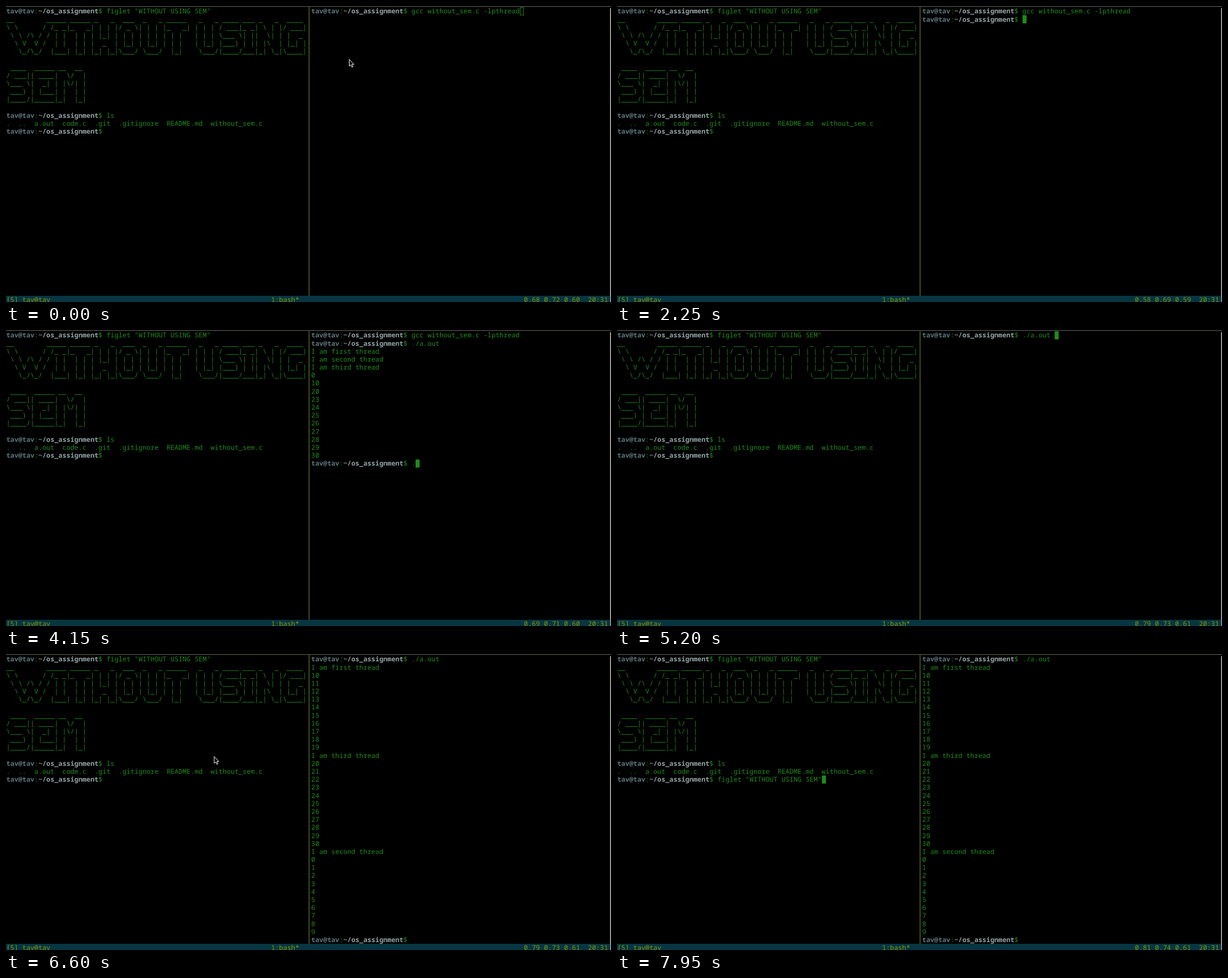
Recreate the animation shown at these times as an HTML page. Size 1069 px wide and 524 px high, loop 8 s.

```html
<!DOCTYPE html>
<html lang="en">
<head>
<meta charset="utf-8">
<title>Terminal session</title>
<style>
html, body { margin: 0; width: 100%; height: 100%; overflow: hidden; background: #000; }
svg { display: block; width: 1069px; height: 524px; }
text {
  font: 11.817px "Noto Sans Mono", "DejaVu Sans Mono", monospace;
  white-space: pre; fill: #1f8c1a; text-rendering: geometricPrecision;
}
.user { fill: #5d757c; font-weight: bold; }
.path { fill: #93a3a4; font-weight: bold; }
.bar text { fill: #859900; }
</style>
</head>
<body>
<svg viewBox="0 0 1069 524">
  <rect width="1069" height="524"/>
  <rect width="1069" height="1.6" fill="#45443f"/>
  <rect x="1067.4" y="4" width="1.6" height="520" fill="#b9b9b5"/>
  <rect x="535" y="2" width="1" height="511" fill="#7b8839"/>
  <g class="bar">
    <rect y="513" width="1067.4" height="11" fill="#073642"/>
    <g id="status"></g>
  </g>
  <g id="left"></g>
  <g id="right"></g>
  <rect id="caret" height="14.4"/>
  <path id="mouse" d="M.5.5V12.6L3.2 10.1 5.2 14.4 7.1 13.5 5.2 9.3H8.6Z" fill="#000" stroke="#fff" stroke-width="1"/>
</svg>
<script>
const LOOP = 8000, CW = 7.09, CH = 14.19, X0 = 0.5, Y0 = 2.3;
const RIGHT = 76, PROMPT_LEN = 25;
const USER = "tav@tav";
const $ = id => document.getElementById(id);
const colX = c => X0 + c * CW;
const rowY = r => Y0 + r * CH;
const escape = s => s.replace(/&/g, "&amp;").replace(/</g, "&lt;");
const line = (s, c, r) => `<text x="${colX(c)}" y="${rowY(r) + 11.05}">${s}</text>`;
const prompt = (cmd = "") =>
  `<tspan class="user">${USER}</tspan>:<tspan class="path">~/os_assignment</tspan>$ ${escape(cmd)}`;
const range = (a, b) => Array.from({ length: b - a + 1 }, (_, i) => String(a + i));
const thread = n => `I am ${n} thread`;

const FIGLET = 'figlet "WITHOUT USING SEM"';
const BANNER = String.raw`
__        _____ _____ _   _  ___  _   _ _____   _   _ ____ ___ _   _  ____
\ \      / /_ _|_   _| | | |/ _ \| | | |_   _| | | | / ___|_ _| \ | |/ ___|
 \ \ /\ / / | |  | | | |_| | | | | | | | | |   | | | \___ \| ||  \| | |  _
  \ V  V /  | |  | | |  _  | |_| | |_| | | |   | |_| |___) | || |\  | |_| |
   \_/\_/  |___| |_| |_| |_|\___/ \___/  |_|    \___/|____/___|_| \_|\____|

 ____  _____ __  __
/ ___|| ____|  \/  |
\___ \|  _| | |\/| |
 ___) | |___| |  | |
|____/|_____|_|  |_|
`.slice(1).split("\n");
const FILES = ".  ..  a.out  code.c  .git  .gitignore  README.md  without_sem.c";

const GCC = prompt("gcc without_sem.c -lpthread");
const RUN = prompt("./a.out");
const FIRST_RUN = [GCC, RUN, ...["first", "second", "third"].map(thread), "0", "10", "20", ...range(23, 30)];
const SECOND_RUN = [RUN, thread("first"), ...range(10, 19), thread("third"), ...range(20, 30),
  thread("second"), ...range(0, 9), prompt()];

// Latest value in a list of [time, value] steps
function at(steps, t) {
  let v = steps[0][1];
  for (const [time, value] of steps) if (t >= time) v = value;
  return v;
}

const LOADS = [[0, "0.68 0.72 0.60"], [600, "0.58 0.69 0.59"], [3000, "0.69 0.71 0.60"],
  [5200, "0.79 0.73 0.61"], [7050, "0.81 0.74 0.61"]];
const TYPED_1 = [[2250, ""], [2300, "."], [2400, "./"], [2500, "./a"], [2650, "./a.out "]];
const TYPED_2 = [[3250, ""], [4150, "."], [4200, "./"], [4600, "./a"], [4800, "./a.out "]];
const TYPED_LEFT = [[0, ""], [7800, "ls"], [7950, FIGLET]];
const CARET_ON = [[0, 1], [850, 0], [1200, 1], [1450, 0], [1750, 1], [3000, 0], [3250, 1],
  [3550, 0], [3850, 1], [4500, 0], [4600, 1], [5700, 0], [6050, 1], [6350, 0], [6650, 1],
  [6900, 0], [7200, 1], [7500, 0], [7800, 1]];

// Rows of the right pane and the caret cell [column, row]
function rightPane(t) {
  if (t < 1800) return [[GCC], [RIGHT + 52, 0]];
  if (t < 2250) return [[GCC], [RIGHT, 1]];
  const caret = (cmd, r) => [RIGHT + PROMPT_LEN + cmd.length, r];
  if (t < 3250) {
    const cmd = at(TYPED_1, t);
    return [[GCC, prompt(cmd)], caret(cmd, 1)];
  }
  if (t < 5200) {
    const cmd = at(TYPED_2, t);
    return [[...FIRST_RUN, prompt(cmd)], caret(cmd, 16)];
  }
  if (t < 5450) return [[RUN], caret("./a.out ", 0)];
  return [SECOND_RUN, caret("", 35)];
}

function mousePos(t) {
  if (t < 1800) return [606, 94];
  if (t < 6250 || t >= 7800) return null;
  const u = Math.min(1, (t - 6250) / 450), e = u * u * (3 - 2 * u);
  const bend = (a, b, c) => a * (1 - e) ** 2 + 2 * b * e * (1 - e) + c * e * e;
  return [bend(606, 490, 327), bend(94, -107, 266)];
}

const drawn = {};
function fill(id, html) {
  if (drawn[id] !== html) $(id).innerHTML = drawn[id] = html;
}
function set(el, attrs) {
  for (const k in attrs) el.setAttribute(k, attrs[k]);
}

function render(t) {
  const cmd = at(TYPED_LEFT, t);
  const left = [prompt(FIGLET), ...BANNER.map(escape), prompt("ls"), FILES, prompt(cmd)];
  const [right, rightCaret] = rightPane(t);
  fill("left", left.map((s, r) => line(s, 0, r)).join(""));
  fill("right", right.map((s, r) => line(s, RIGHT, r)).join(""));
  fill("status", line("[5] " + USER, 0, 36) + line("1:bash*", 66, 36) +
    line(at(LOADS, t) + "  20:31", 129, 36));

  const [c, r] = t < 7050 ? rightCaret : [PROMPT_LEN + cmd.length, 15];
  const hollow = t < 550, inset = hollow ? 0.5 : 0;
  set($("caret"), {
    x: colX(c) + inset, y: rowY(r) + inset,
    width: CW - 2 * inset, height: CH - 2 * inset,
    fill: hollow ? "none" : "#1f8c1a", stroke: hollow ? "#1f8c1a" : "none",
    visibility: at(CARET_ON, t) ? "visible" : "hidden"
  });

  const pos = mousePos(t);
  set($("mouse"), {
    visibility: pos ? "visible" : "hidden",
    transform: `translate(${pos || [0, 0]})`
  });
}

const start = performance.now();
function tick() {
  const t = (performance.now() - start) % LOOP;
  render(Math.floor(t / 50) * 50);
  requestAnimationFrame(tick);
}
tick();
</script>
</body>
</html>
```
